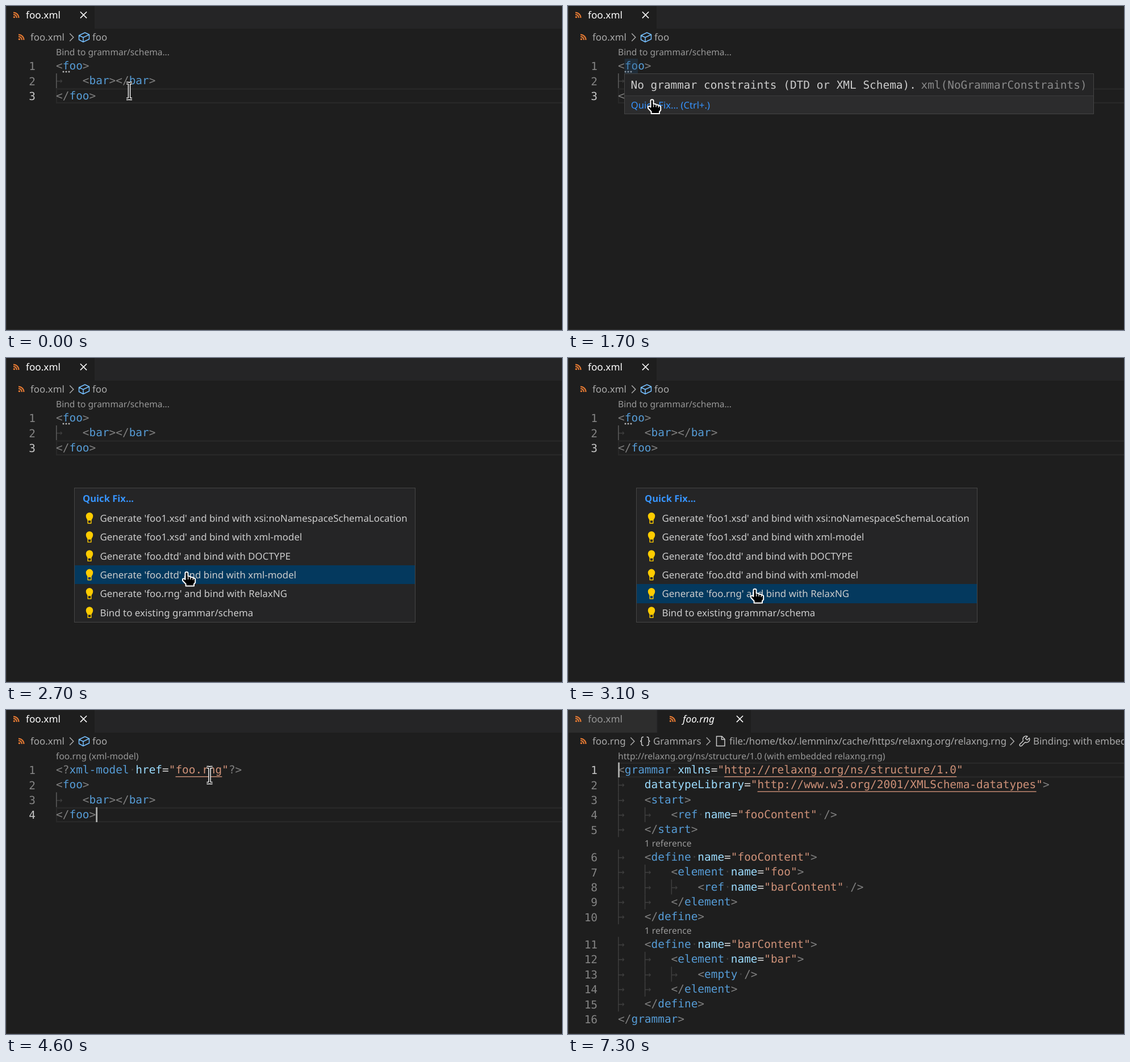
An HTML page that plays this animation: 979 px wide and 572 px high, repeating every 7500 ms.

```html
<!DOCTYPE html>
<html lang="en">
<head>
<meta charset="utf-8">
<title>Generate grammar and bind</title>
<style>
html, body { margin: 0; width: 100%; height: 100%; overflow: hidden; background: #1e1e1e; }
svg { display: block; }
text { white-space: pre; text-rendering: geometricPrecision; font: 16.9px "Noto Sans", sans-serif; fill: #ccc; }
.code, .num { font: 19.42px "DejaVu Sans Mono", monospace; }
.num { fill: #858585; text-anchor: end; }
.num.on { fill: #c6c6c6; }
.lens { font-size: 15.55px; fill: #999; }
.crumb { fill: #a9a9a9; }
.punct { fill: #808080; }
.tag { fill: #569cd6; }
.attr { fill: #9cdcfe; }
.str { fill: #ce9178; }
.eq { fill: #d4d4d4; }
.ws { fill: #3e3e3e; }
.title { font-size: 17.2px; fill: #fff; }
.dim { fill: #969696; }
.slant { font-style: italic; }
.link { font-size: 16.57px; fill: #3794ff; }
.bold { font-weight: bold; }
.line { fill: none; stroke: #ccc; stroke-width: 1.5; }
.ink { fill: #000; stroke: #fff; stroke-width: 2; stroke-linejoin: round; }
#pick { shape-rendering: crispEdges; }
</style>
</head>
<body>
<svg width="979" height="572" viewBox="0 0 979 572">
  <defs>
    <g id="feed" fill="none" stroke="#e37933" stroke-width="2.2">
      <circle cx="-3.6" cy="3.6" r="1.7" fill="#e37933" stroke="none"/>
      <path d="M-5 -.9A5.6 5.6 0 0 1 .9 5M-5 -4.4A9.2 9.2 0 0 1 4.4 5"/>
    </g>
    <path id="cross" d="M-5.6 -5.6L5.6 5.6M5.6 -5.6L-5.6 5.6" stroke="#fff" stroke-width="1.6"/>
    <path id="chevron" d="M-3.3 -6.8L3.3 0L-3.3 6.8" fill="none" stroke="#a9a9a9" stroke-width="1.5"/>
    <g id="bulb" fill="#fc0">
      <path d="M-3.6 4.6C-3.6 1.8 -6.2 .8 -6.2 -3.6A6.2 6.2 0 0 1 6.2 -3.6C6.2 .8 3.6 1.8 3.6 4.6Z"/>
      <path d="M-2.9 4.6V9.3H2.9V4.6" fill="none" stroke="#fc0" stroke-width="1.4" stroke-linejoin="round"/>
    </g>
    <path id="stem" d="M-5 -14H-2Q0 -14 0 -12V12Q0 14 -2 14H-5M5 -14H2Q0 -14 0 -12M5 14H2Q0 14 0 12" fill="none"/>
    <g id="beam">
      <use href="#stem" stroke="#fff" stroke-width="4.6"/>
      <use href="#stem" stroke="#000" stroke-width="1.7"/>
    </g>
    <path id="arrow" class="ink" d="M1 1.5V27.5L7 22L11.3 31.5L15.2 29.8L11 20.5L18.6 20Z"/>
    <g id="hand">
      <path class="ink" d="M-2.5 1.8Q-2.5 -.2 0 -.2T2.5 1.8V7.4H5.5Q7 7.4 7 9H10Q11.5 9 11.5 10.8H13Q15.2 10.8 15.2 13V18.5L13 21V24.4H-1.4V21L-7 15V12.2Q-4.5 10.6 -2.5 13Z"/>
      <path d="M2.6 9V13M7 10V13M11.3 11.4V14" stroke="#fff" stroke-width="1.2"/>
    </g>
  </defs>
  <rect width="979" height="40" fill="#252526"/>
  <g id="xmlTabs"></g>
  <g id="rngTabs"></g>
  <g id="docs"></g>
  <rect id="caret" width="2.8" height="26.35" fill="#aeafad"/>
  <g id="hover"></g>
  <g id="menu"></g>
  <path d="M.5 0V572M0 571.5H979" stroke="#333334"/>
  <use id="pointer"/>
</svg>
<script>
const $ = id => document.getElementById(id);
const LEFT = 88.1, TOP = 70.4, ROW = 26.35, LENS = 22.2, CH = 11.69;
const ITEM_TOP = 266, ITEM = 33.3, LOOP = 7500;

const esc = s => s.replace(/&/g, '&amp;').replace(/</g, '&lt;');
const text = (x, y, s, cls = '') => `<text x="${x}" y="${y}" class="${cls}">${esc(s)}</text>`;
const use = (id, x, y) => `<use href="#${id}" x="${x}" y="${y}"/>`;
const rect = (x, y, w, h, style) => `<rect x="${x}" y="${y}" width="${w}" height="${h}" ${style}/>`;

// Syntax colouring of one line; tabs become arrows with indent guides.
function codeLine(src, y, guideColor) {
  const body = src.trimStart(), depth = src.length - body.length;
  const base = Math.floor(y + 19.9); // text sits on whole pixels
  let out = '', col = depth * 4, spans = '', prev = '';
  for (let i = 0; i < depth; i++) {
    const x = LEFT + i * 4 * CH;
    out += text(x, base, '→', 'code ws') + rect(x, y, 1.4, ROW, `fill="${guideColor}"`);
  }
  const start = LEFT + col * CH;
  for (const tok of body.match(/<[?\/]?|[?\/]?>|"[^"]*"|[ =]|[\w-]+/g)) {
    const cls = /[<>]/.test(tok) ? 'punct' : tok[0] === '"' ? 'str' : tok === ' ' ? 'ws'
      : tok === '=' ? 'eq' : prev[0] === '<' ? 'tag' : 'attr';
    spans += `<tspan class="${cls}">${tok === ' ' ? '·' : esc(tok)}</tspan>`;
    if (/^"(http|foo\.rng)/.test(tok))
      out += rect(LEFT + (col + 1) * CH, y + 24.4, (tok.length - 2) * CH, 1.4, 'fill="#ce9178"');
    col += tok.length;
    prev = tok;
  }
  return out + `<text class="code" x="${start}" y="${base}">${spans}</text>`;
}

// lenses: line index -> [column, label]
function makeDoc({ lines, lenses = {}, active, caretCol, hint, guideColor }) {
  let y = TOP, out = '', caretY = 0;
  lines.forEach((src, i) => {
    if (lenses[i]) {
      const [col, label] = lenses[i];
      out += text(LEFT + col * CH, y + 16.9, label, 'lens');
      y += LENS;
    }
    if (i === active) {
      caretY = y;
      out += rect(LEFT + .9, y + 1.2, 900, ROW - 2, 'fill="none" stroke="#282828" stroke-width="2.4"');
    }
    out += text(52, y + 20.6, String(i + 1), i === active ? 'num on' : 'num') + codeLine(src, y, guideColor);
    if (i === hint)
      for (let k = 0; k < 3; k++) out += `<circle class="hint" cx="${101 + k * 5}" cy="${y + 23.4}" r="1.5" fill="#b5b5b5"/>`;
    y += ROW;
  });
  const el = document.createElementNS('http://www.w3.org/2000/svg', 'g');
  el.innerHTML = out;
  $('docs').append(el);
  return { el, caretX: LEFT + caretCol * CH, caretY };
}

const plain = ['<foo>', '\t<bar></bar>', '</foo>'];
const bound = ['<?xml-model href="foo.rng"?>', ...plain];
const define = (name, inner) => [
  `\t<define name="${name}Content">`, `\t\t<element name="${name}">`, `\t\t\t${inner}`, '\t\t</element>', '\t</define>'];
const grammar = [
  '<grammar xmlns="http://relaxng.org/ns/structure/1.0"',
  '\tdatatypeLibrary="http://www.w3.org/2001/XMLSchema-datatypes">',
  '\t<start>', '\t\t<ref name="fooContent" />', '\t</start>',
  ...define('foo', '<ref name="barContent" />'), ...define('bar', '<empty />'), '</grammar>'];

const bindLens = [0, 'Bind to grammar/schema...'], refLens = [4, '1 reference'];
const xmlView = { active: 3, caretCol: 6, guideColor: '#606060' };
const rngView = { lines: grammar, active: 0, caretCol: 0, guideColor: '#404040' };
const docs = [
  [0, makeDoc({ ...xmlView, lines: plain, lenses: { 0: bindLens }, active: 2, hint: 0 })],
  [3400, makeDoc({ ...xmlView, lines: bound, lenses: { 1: bindLens }, hint: 1 })],
  [3700, makeDoc({ ...xmlView, lines: bound, lenses: { 0: [0, 'foo.rng (xml-model)'] }, hint: 1 })],
  [5000, makeDoc(rngView)],
  [5200, makeDoc({ ...rngView, lenses: {
    0: [0, 'http://relaxng.org/ns/structure/1.0 (with embedded relaxng.rng)'], 5: refLens, 10: refLens } })]
];

$('xmlTabs').innerHTML =
  rect(0, 0, 156, 40, 'fill="#1e1e1e"') + use('feed', 18, 16) + text(35, 22.2, 'foo.xml', 'title') + use('cross', 136.5, 15.8) +
  use('feed', 27, 55) + text(43, 61.3, 'foo.xml', 'crumb') + use('chevron', 115.5, 55.3) +
  '<path d="M128.5 52L139 47L146.5 50.5V58.5L136 63.5L128.5 59.5ZM128.5 52L136 55.5L146.5 50.5M136 55.5V63.5" fill="none" stroke="#75beff" stroke-width="1.5" stroke-linejoin="round"/>' +
  text(152, 61.3, 'foo', 'crumb');

$('rngTabs').innerHTML =
  rect(0, 0, 156.5, 40, 'fill="#2d2d2d"') + rect(157.5, 0, 164.5, 40, 'fill="#1e1e1e"') +
  use('feed', 18, 16) + text(35, 22.2, 'foo.xml', 'title dim') +
  use('feed', 184, 16) + text(202, 22.2, 'foo.rng', 'title slant') + use('cross', 302.5, 15.8) +
  use('feed', 27, 55) + text(43, 61.3, 'foo.rng', 'crumb') + use('chevron', 113.5, 55.3) +
  '<path class="line" d="M133 47.5Q129.5 47.5 129.5 50.5V52.5Q129.5 55 127 55Q129.5 55 129.5 57.5V60Q129.5 62.8 133 62.8M138.5 47.5Q142 47.5 142 50.5V52.5Q142 55 144.5 55Q142 55 142 57.5V60Q142 62.8 138.5 62.8"/>' +
  text(150, 61.3, 'Grammars', 'crumb') + use('chevron', 247, 55.3) +
  '<path class="line" d="M261.5 46.5H271L276 51.5V63.5H261.5ZM270.5 46.5V52H276"/>' +
  text(284, 61.3, 'file:/home/tko/.lemminx/cache/https/relaxng.org/relaxng.rng', 'crumb') + use('chevron', 782, 55.3) +
  '<path class="line" stroke-linejoin="round" d="M809 46.5Q804.5 45 801.8 48.5Q800 51.5 801.5 54.5L795.5 60.5Q794.5 62 795.8 63.2T798.8 63.2L804.8 57Q808 58.5 811 56Q813.8 53 812.3 49.5L808.5 53L805.5 50.2Z"/>' +
  text(819, 61.3, 'Binding: with embedded relaxng.rng', 'crumb');

$('hover').innerHTML =
  rect(99.7, 93, 23.4, 26, 'fill="#264f78" fill-opacity=".3"') +
  rect(99.5, 119.5, 826, 71, 'fill="#252526" stroke="#454545"') +
  rect(100, 158.5, 825, 31.5, 'fill="#2c2c2d"') + rect(100, 158, 825, 1, 'fill="#3c3c3d"') +
  text(110.5, 145.6, 'No grammar constraints (DTD or XML Schema).', 'code') +
  `<g opacity=".6">${text(621.5, 145.6, 'xml(NoGrammarConstraints)', 'code')}</g>` +
  text(110.8, 180.6, 'Quick Fix... (Ctrl+.)', 'link');

const actions = [
  "Generate 'foo1.xsd' and bind with xsi:noNamespaceSchemaLocation",
  "Generate 'foo1.xsd' and bind with xml-model",
  "Generate 'foo.dtd' and bind with DOCTYPE",
  "Generate 'foo.dtd' and bind with xml-model",
  "Generate 'foo.rng' and bind with RelaxNG",
  'Bind to existing grammar/schema'];
$('menu').innerHTML =
  rect(120.5, 229.5, 600, 237, 'fill="#252526" stroke="#454545"') +
  rect(121, 0, 599, ITEM, 'id="pick" fill="#04395e"') +
  text(135, 254.3, 'Quick Fix...', 'link bold') +
  actions.map((s, i) => use('bulb', 147, 282.5 + i * ITEM) + text(165.5, 289 + i * ITEM, s)).join('');

// Pointer keys: time, x, y, shape
const path = [
  [0, 217, 150, 'beam'], [200, 217, 150, 'beam'], [800, 107, 108, 'beam'], [1100, 107, 108, 'beam'],
  [1600, 146, 161, 'hand'], [1700, 148, 165.5, 'hand'], [2100, 148, 165.5, 'hand'],
  [2200, 162, 183, 'beam'], [2300, 205, 222, 'beam'], [2400, 243, 256.5, 'arrow'],
  [2500, 292, 320, 'hand'], [2600, 292, 320, 'hand'], [2700, 318, 378, 'hand'],
  [2800, 327, 405, 'hand'], [2900, 327, 405, 'hand'], [3100, 329, 408, 'hand'],
  [3300, 328, 410, 'beam'], [3800, 328, 410, 'beam'], [4600, 358.5, 115, 'beam'], [4700, 358.5, 115, 'beam'],
  [4800, 358.5, 110, 'hand'], [4900, 358.5, 108, 'hand'], [5000, 358.5, 108, 'beam'],
  [5600, 358.5, 108, 'beam'], [6000, 403, 321, 'beam'], [6100, 403, 321, '']];
const last = (list, t) => list.findLastIndex(k => k[0] <= t);

function pointerAt(t) {
  const i = last(path, t), a = path[i], b = path[i + 1] || a;
  const u = b === a ? 0 : (t - a[0]) / (b[0] - a[0]), e = u * u * (3 - 2 * u);
  return { x: a[1] + (b[1] - a[1]) * e, y: a[2] + (b[2] - a[2]) * e, shape: a[3] };
}

const show = (el, on) => { el.style.display = on ? '' : 'none'; };
const within = (t, a, b) => t >= a && t < b;
const hints = document.querySelectorAll('.hint');

function draw(t) {
  const now = last(docs, t), doc = docs[now][1];
  docs.forEach(([, d], i) => show(d.el, i === now));
  show($('xmlTabs'), t < 5000);
  show($('rngTabs'), t >= 5000);
  show($('hover'), within(t, 900, 1900));
  show($('menu'), within(t, 1900, 3300));
  hints.forEach(h => show(h, t < 3900));

  const blinkFrom = t < 5000 ? 3400 : 5300;
  show($('caret'), t >= 3400 && (t < blinkFrom || (t - blinkFrom) % 1000 < 500));
  $('caret').setAttribute('x', doc.caretX);
  $('caret').setAttribute('y', doc.caretY);

  const p = pointerAt(t), row = Math.floor((p.y - ITEM_TOP) / ITEM);
  show($('pick'), t >= 2500 && row >= 0);
  $('pick').setAttribute('y', ITEM_TOP + row * ITEM);
  show($('pointer'), p.shape);
  if (p.shape) $('pointer').setAttribute('href', '#' + p.shape);
  $('pointer').setAttribute('transform', `translate(${p.x} ${p.y})`);
}

// The screen refreshes in 100 ms steps.
const begin = performance.now();
function tick() {
  draw(Math.floor((performance.now() - begin) % LOOP / 100) * 100);
  requestAnimationFrame(tick);
}
tick();
</script>
</body>
</html>
```
